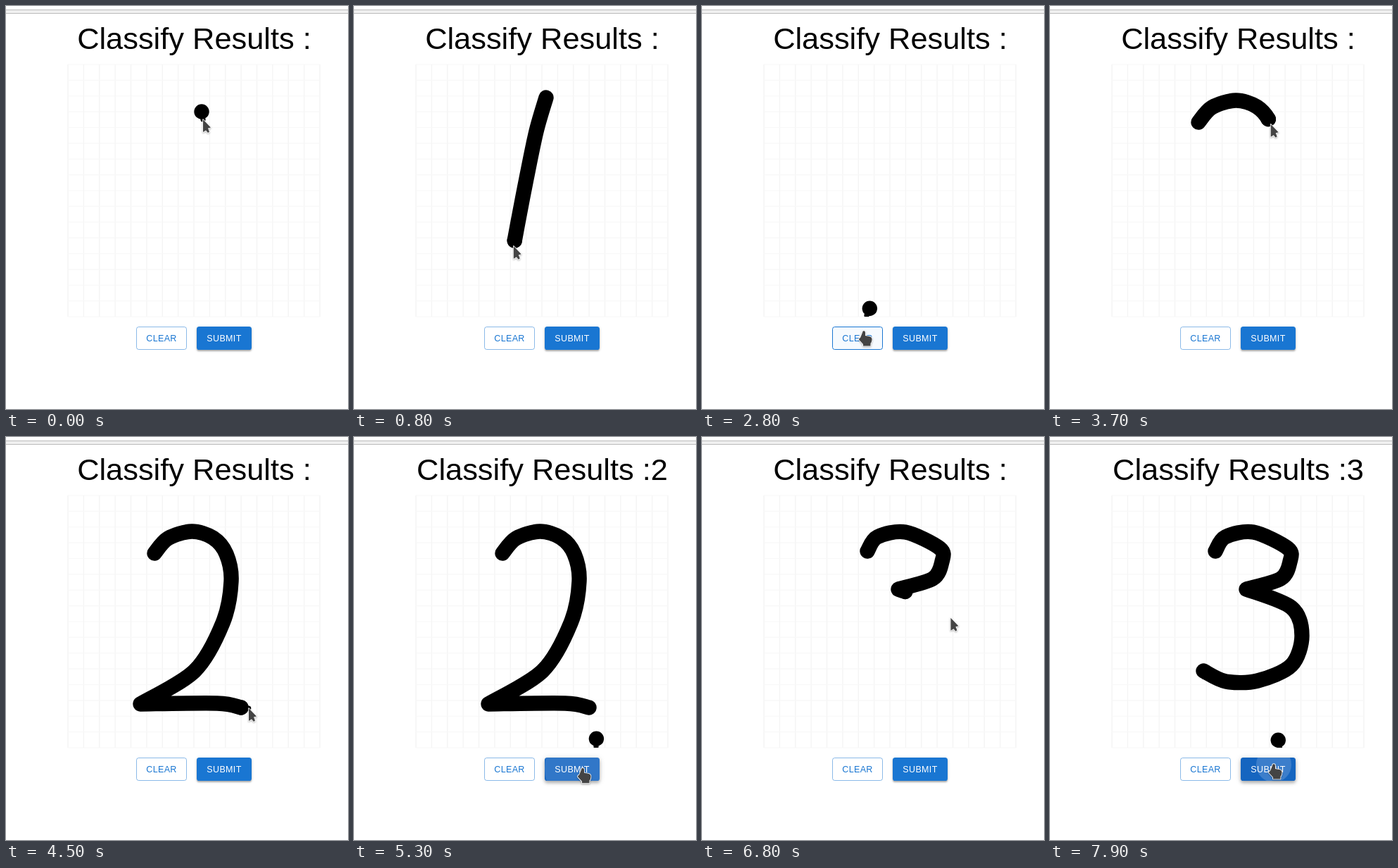
These frames come from a looping animation (486x572 px, 8 s). An HTML page:

```html
<!DOCTYPE html>
<html lang="en">
<head>
<meta charset="utf-8">
<title>Digit pad</title>
<style>
  html, body { margin: 0; width: 100%; height: 100%; overflow: hidden; background: #fff; }
  body { position: relative; font-family: "Liberation Sans", Arial, sans-serif; }
  svg { position: absolute; left: 0; top: 0; }
  .bar { position: absolute; top: 5px; width: 100%; height: 4px; background: #f0f0f0;
    border: solid #bcbcbc; border-width: 1px 0; }
  .btn { position: absolute; top: 455px; height: 33px; box-sizing: border-box; overflow: hidden;
    border-radius: 3.6px; font-size: 12.5px; letter-spacing: .02857em; line-height: 35px; text-align: center; }
  #clear { left: 185px; width: 72px; color: #1976d2; line-height: 33px;
    border: 1px solid rgba(25, 118, 210, .5); }
  #clear.hover { border-color: #1976d2; background: rgba(25, 118, 210, .04); }
  #submit { left: 271px; width: 78px; color: #fff; background: #1976d2;
    box-shadow: 0 2px 2px rgba(0, 0, 0, .25), 0 1px 4px rgba(0, 0, 0, .15); }
  #submit.hover { background: #1565c0;
    box-shadow: 0 3px 4px rgba(0, 0, 0, .25), 0 1px 9px rgba(0, 0, 0, .15); }
  .ripple { position: absolute; border-radius: 50%; background: currentColor; }
  #cursor { filter: drop-shadow(0 1px 1px rgba(0, 0, 0, .3)); }
</style>
</head>
<body>
<div class="bar"></div>
<svg width="486" height="572">
  <clipPath id="pad"><rect x="88" y="83" width="358" height="358"/></clipPath>
  <text id="title" x="267.5" y="61" font-size="43.4" text-anchor="middle"></text>
  <path id="cols" stroke="#f4f4f4" stroke-width="1.4"/>
  <path id="rows" stroke="#f8f8f8" stroke-width="1.2"/>
  <g clip-path="url(#pad)">
    <path id="ink" fill="none" stroke="#000" stroke-width="21.4" stroke-linecap="round" stroke-linejoin="round"/>
    <circle id="brush" r="10.7"/>
    <circle id="tip" r="3.6"/>
  </g>
</svg>
<div id="clear" class="btn">CLEAR<span class="ripple"></span></div>
<div id="submit" class="btn">SUBMIT<span class="ripple"></span></div>
<svg width="486" height="572">
  <path id="cursor" fill="#444" stroke="#fff" stroke-width="1.6" stroke-linejoin="round" paint-order="stroke"/>
</svg>
<script>
const LOOP = 8000, STEP = 100, TICK = 10, ROPE = 10.7;
const $ = id => document.getElementById(id);
const clamp = v => Math.min(1, Math.max(0, v));
const within = (t, [from, to]) => t >= from && t < to;

const ARROW = 'M0 0L11 11.5L7 12.5L9 17.5L7 19L4 15.5L0 18Z';
const HAND = 'M-2 1.5Q-2-1 0-1Q2-1 2 1.5V6L8 7Q12 8 11.5 12Q11 16 9.5 17V20.5H-1V18L-7 11.5Q-7 9-5 9Z';

// Each digit is one or two smooth runs of points
// keys: [time, drawn share]; lead: how far the pointer runs ahead mid-stroke
const strokes = [
  { runs: ['273,130 259,178 245,245 233,307 222,367'],
    keys: [[200, 0], [900, 1]], until: 2800, lead: 0 },
  { runs: ['211,165 230,144 264,134 294,143 313,166 320,205 308,264 268,332 191,379', '191,379 300,378 334,384'],
    keys: [[3500, 0], [4400, 1]], until: 5800, lead: 0 },
  { runs: ['235,162 249,142 289,135 338,158 341,177 328,201 279,216',
           '279,216 343,242 358,282 343,324 295,346 250,347 218,332'],
    keys: [[6300, 0], [6800, .45], [7200, 1]], until: LOOP, lead: 70 }
];

// Free pointer moves: [time, x, y]
const drawOne = [[0, 280, 161], [200, 276, 119], [900, 220, 378], [1000, 228, 384], [1200, 273, 399],
  [1270, 289, 439], [1300, 290, 460], [1400, 289, 471], [2600, 289, 471]];
const drawTwo = [[2680, 246, 400], [2750, 234, 439], [2800, 230, 462], [2900, 230, 462], [3000, 234, 430],
  [3500, 210, 157], [4400, 342, 385], [4500, 345, 385], [4600, 346, 410], [4690, 344, 439],
  [4700, 343, 446], [4800, 325, 470], [5400, 325, 471]];
const drawThree = [[5600, 222, 470], [5800, 220, 468], [5890, 220, 468], [5900, 272, 257], [6200, 236, 155],
  [7200, 212, 324], [7300, 254, 368], [7420, 318, 400], [7460, 327, 439], [7500, 325, 446], [7600, 318, 465]];
const moves = [...drawOne, ...drawTwo, ...drawThree];

const TOP = 455, HEIGHT = 33;
const buttons = [
  { el: $('submit'), left: 271, width: 78, hovers: [[1300, 2700], [4800, 5500], [7600, LOOP]],
    clicks: [1800, 4900, 7700] },
  { el: $('clear'), left: 185, width: 72, hovers: [[2800, 3000], [5600, 6000]],
    clicks: [2800, 5800] }
];
const results = [[2000, 2800], [5100, 5800], [7800, LOOP]];

function sample(keys, t) {
  const i = keys.findIndex(k => k[0] > t);
  if (i < 0) return keys[keys.length - 1];
  if (i === 0) return keys[0];
  const a = keys[i - 1], b = keys[i], p = (t - a[0]) / (b[0] - a[0]);
  return a.map((v, n) => v + (b[n] - v) * p);
}

function smooth(run) {
  const pts = run.split(' ').map(p => p.split(',').map(Number));
  const at = i => pts[Math.min(pts.length - 1, Math.max(0, i))];
  const handle = (i, sign) => at(i).map((v, n) => v + sign * (at(i + 1)[n] - at(i - 1)[n]) / 6.5);
  return pts.slice(1).map((p, i) => `C${handle(i, 1)} ${handle(i + 1, -1)} ${p}`).join('');
}

for (const s of strokes) {
  s.path = document.createElementNS('http://www.w3.org/2000/svg', 'path');
  s.d = 'M' + s.runs[0].split(' ')[0] + s.runs.map(smooth).join('');
  s.path.setAttribute('d', s.d);
  s.total = s.path.getTotalLength();
  s.span = [s.keys[0][0], s.keys[s.keys.length - 1][0]];
}

// Point on a stroke, continued straight past its end
function along({ path, total }, s) {
  const p = path.getPointAtLength(Math.min(s, total));
  if (s <= total) return p;
  const q = path.getPointAtLength(total - 2), k = (s - total) / 2;
  return { x: p.x + (p.x - q.x) * k, y: p.y + (p.y - q.y) * k };
}

function pointerAt(t) {
  const s = strokes.find(s => within(t, s.span));
  if (s) {
    const share = sample(s.keys, t)[1];
    return along(s, s.total * share + 8 + s.lead * Math.sin(Math.PI * share));
  }
  const [, x, y] = sample(moves, t);
  return { x, y };
}

// The brush hangs on a short rope behind the pointer and ignores it outside the pad
function trailBrush() {
  const poses = [];
  let brush = { x: 278, y: 150 }, tip = { x: 280, y: 161 };
  for (let t = 0; t < LOOP; t += TICK) {
    const s = strokes.find(s => t >= s.span[0] && t <= s.span[1]);
    if (s) brush = along(s, s.total * sample(s.keys, t)[1]);
    if (t % STEP === 0) poses.push({ brush, tip, drawing: !!s });
    const p = pointerAt(t);
    if (p.y > 441) continue;
    tip = p;
    const dx = p.x - brush.x, dy = p.y - brush.y, d = Math.hypot(dx, dy);
    if (d > ROPE) brush = { x: p.x - dx / d * ROPE, y: p.y - dy / d * ROPE };
  }
  return poses;
}
const poses = trailBrush();

function drawRipple(b, t) {
  const dot = b.el.querySelector('.ripple');
  const click = b.clicks.find(c => within(t, [c, c + 650]));
  dot.style.display = click ? '' : 'none';
  if (!click) return;
  const at = pointerAt(click), age = t - click, x = at.x - b.left, y = at.y - TOP;
  const full = Math.hypot(Math.max(x, b.width - x) + 1, Math.max(y, HEIGHT - y) + 1);
  const p = clamp(age / 550), grow = p * p * (3 - 2 * p) * (1 - p) + (1 - (1 - p) ** 3) * p;
  const r = full * grow, edge = b.el.clientLeft;
  Object.assign(dot.style, {
    left: x - r - edge + 'px', top: y - r - edge + 'px', width: 2 * r + 'px', height: 2 * r + 'px',
    opacity: (.12 + .1 * grow) * (1 - clamp((age - 200) / 450))
  });
}

const place = (id, p) => $(id).setAttribute('transform', `translate(${p.x} ${p.y})`);

function draw(t) {
  const { brush, tip, drawing } = poses[t / STEP], pointer = pointerAt(t);
  const stroke = strokes.find(s => within(t, [s.span[0], s.until]));
  $('ink').style.display = stroke ? '' : 'none';
  if (stroke) {
    $('ink').setAttribute('d', stroke.d);
    $('ink').setAttribute('stroke-dasharray', `${stroke.total * sample(stroke.keys, t)[1]} 9999`);
  }
  place('brush', brush);
  place('tip', tip);
  $('tip').style.display = drawing ? 'none' : '';

  const shown = results.findIndex(r => within(t, r));
  $('title').textContent = 'Classify Results :' + (shown < 0 ? '' : shown + 1);

  let hand = false;
  for (const b of buttons) {
    b.el.classList.toggle('hover', b.hovers.some(h => within(t, h)));
    hand ||= pointer.y >= TOP && pointer.x >= b.left && pointer.x <= b.left + b.width;
    drawRipple(b, t);
  }
  $('cursor').setAttribute('d', hand ? HAND : ARROW);
  place('cursor', pointer);
}

let cols = '', rows = '';
for (let i = 0; i <= 16; i++) {
  const o = i * 22.375;
  cols += `M${88 + o} 83V441`;
  rows += `M88 ${83 + o}H446`;
}
$('cols').setAttribute('d', cols);
$('rows').setAttribute('d', rows);

const start = performance.now();
function tick() {
  const t = Math.max(0, performance.now() - start) % LOOP;
  draw(Math.floor(t / STEP) * STEP);
  requestAnimationFrame(tick);
}
tick();
</script>
</body>
</html>
```
